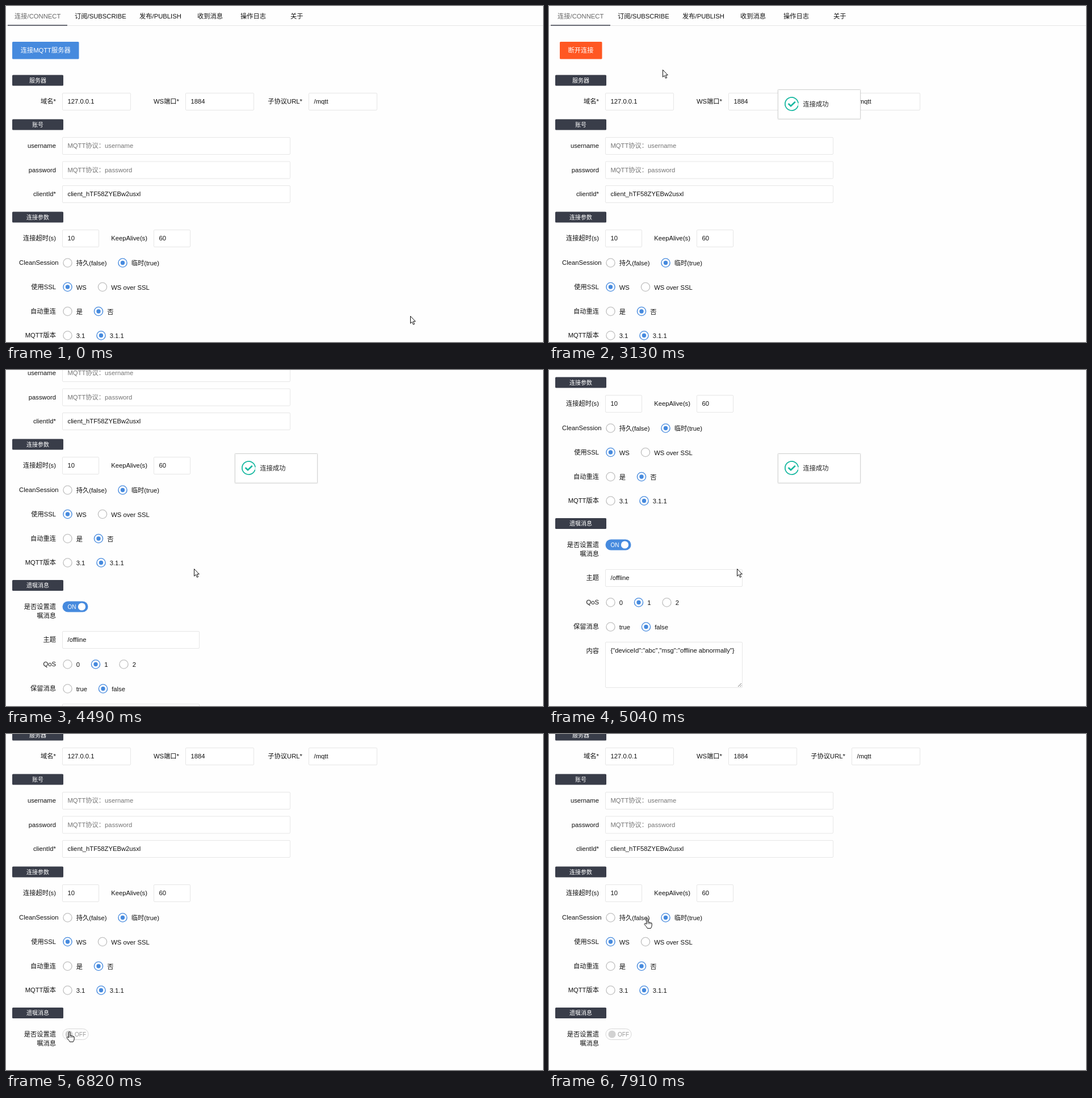
Animation of 946 by 592 pixels, one loop 8 s. Source, as an HTML page:

```html
<!DOCTYPE html>
<html lang="zh">
<head>
<meta charset="utf-8">
<style>
html, body { margin: 0; width: 100%; height: 100%; overflow: hidden; background: #fefefe; }
svg { display: block; font: 11.25px "Liberation Sans", Arial, "Noto Sans CJK SC", "Noto Sans CJK", sans-serif; }
.tag { font-size: 10px; }
</style>
</head>
<body>
<svg id="stage" width="946" height="592" viewBox="0 0 946 592">
  <g id="page">
    <path d="M0 34.5H946" stroke="#e6e6e6"/>
    <path d="M3 34H108" stroke="#393d49" stroke-width="1.6"/>
    <g id="form"></g>
    <g id="connect">
      <rect x="11" y="63" width="117.5" height="30.5" rx="1.6" fill="#468ade"/>
      <text x="69.7" y="82" fill="#fff" text-anchor="middle">连接MQTT服务器</text>
    </g>
    <g id="disconnect">
      <rect x="19" y="63" width="74.5" height="30.5" rx="1.6" fill="#ff5722"/>
      <text x="56" y="82" fill="#fff" text-anchor="middle">断开连接</text>
    </g>
    <g id="on">
      <rect x="99.5" y="648.5" width="45" height="19" rx="9.5" fill="#468ade"/>
      <circle cx="133.5" cy="658" r="6.6" fill="#fff"/>
      <text class="tag" x="108.5" y="662" fill="#fff">ON</text>
    </g>
    <g id="off">
      <rect x="100" y="648.5" width="45" height="19" rx="9.5" fill="#fff" stroke="#d6d6d6"/>
      <circle cx="111" cy="658" r="6.6" fill="#d2d2d2"/>
      <text class="tag" x="121" y="662" fill="#999">OFF</text>
    </g>
    <g id="will">
      <rect id="area" x="99.5" y="829.5" width="241" height="80" rx="1.6" fill="#fff"/>
      <path d="M333 908l6-6M336.5 908l2.5-2.5" stroke="#666" stroke-width=".9"/>
    </g>
  </g>
  <g id="popup">
    <rect x="402" y="146" width="148" height="55" rx="2" fill="#000" opacity=".04"/>
    <rect x="403.5" y="147.5" width="145" height="51.5" rx="1" fill="#fff" stroke="#d3d4d3"/>
    <circle cx="427.5" cy="172.3" r="11.6" fill="none" stroke="#b9e6df" stroke-width="1.4"/>
    <path d="M438.6 176A11.6 11.6 0 1 1 439 171" fill="none" stroke="#16b8a0" stroke-width="1.7"/>
    <path d="M421.6 172l4.4 4.3 7.8-7.6" fill="none" stroke="#16b8a0" stroke-width="2.6"/>
    <text x="447.5" y="177" fill="#222">连接成功</text>
  </g>
  <g id="cursor" stroke-linejoin="round" stroke="#111">
    <path id="arrow" d="M.5 .5V13.2L3.4 10.5 5.5 15.3 7.6 14.4 5.5 9.7H9.3Z" fill="#fff"/>
    <g id="hand" fill="#fff">
      <path d="M4.5 11V2Q4.5 .6 5.7 .6T7 2V7.2Q9.2 6.4 9.6 8 11.7 7.2 12.1 8.8 14 8.3 14.2 10V13Q14 16 12.3 18.4H6.3Q5.5 16 1.2 11.6 .6 10.4 1.8 9.9 3 9.8 4.5 11Z"/>
      <path d="M7 7V11M9.6 8V11M12 9V11" stroke-width=".8"/>
    </g>
    <path id="beam" d="M0 .5H2.5L3.5 1.5 4.5 .5H7M3.5 1V16M0 16.5H2.5L3.5 15.5 4.5 16.5H7" fill="none"/>
  </g>
</svg>
<script>
const $ = id => document.getElementById(id);

function add(parent, name, attrs, content = '') {
  const node = document.createElementNS('http://www.w3.org/2000/svg', name);
  for (const key in attrs) node.setAttribute(key, attrs[key]);
  node.textContent = content;
  parent.append(node);
}

const form = $('form'), will = $('will');
const text = (g, x, y, s, fill = '#111', extra = {}) => add(g, 'text', { x, y, fill, ...extra }, s);
const label = (g, x, y, s) => text(g, x, y, s, '#111', { 'text-anchor': 'end' });

function tag(y, s) {
  add(form, 'rect', { x: 11, y, width: 90, height: 19, rx: 1.6, fill: '#393d49' });
  text(form, 56, y + 13, s, '#fff', { 'text-anchor': 'middle', class: 'tag' });
}

function field(g, x, y, width, name, value, color) {
  label(g, x - 11.5, y + 19, name);
  add(g, 'rect', { x, y: y + .5, width, height: 30, rx: 1.6, fill: '#fff', stroke: '#e6e6e6' });
  text(g, x + 9, y + 19, value, color);
}

// Each option is [centre x, caption, selected].
function radios(g, y, name, options, labelEnd = 88) {
  label(g, labelEnd, y + 3.5, name);
  for (const [cx, caption, selected] of options) {
    const stroke = selected ? '#468ade' : '#c2c2c2';
    add(g, 'circle', { cx, cy: y, r: 7.6, fill: '#fff', stroke, 'stroke-width': 1.4 });
    if (selected) add(g, 'circle', { cx, cy: y, r: 3.7, fill: stroke });
    text(g, cx + 15.2, y + 4.5, caption);
  }
}

[[15, '连接/CONNECT'], [121, '订阅/SUBSCRIBE'], [235, '发布/PUBLISH'],
 [337, '收到消息'], [413, '操作日志'], [501, '关于']]
  .forEach(([x, s], i) => text(form, x, 22, s, i ? '#111' : '#666'));

tag(121.5, '服务器');
field(form, 99.5, 153, 120, '域名*', '127.0.0.1');
field(form, 316.5, 153, 120, 'WS端口*', '1884');
field(form, 533.5, 153, 120, '子协议URL*', '/mqtt');
tag(199.5, '账号');
field(form, 99.5, 231, 401, 'username', 'MQTT协议：username', '#757575');
field(form, 99.5, 273.5, 401, 'password', 'MQTT协议：password', '#757575');
field(form, 99.5, 316, 401, 'clientId*', 'client_hTF58ZYEBw2usxl');
tag(362.5, '连接参数');
field(form, 99.5, 394, 64, '连接超时(s)', '10');
field(form, 260.5, 394, 64, 'KeepAlive(s)', '60');
radios(form, 452.5, 'CleanSession', [[108.5, '持久(false)'], [205.5, '临时(true)', true]], 92.5);
radios(form, 495, '使用SSL', [[108.5, 'WS', true], [170, 'WS over SSL']]);
radios(form, 538, '自动重连', [[108.5, '是'], [163, '否', true]]);
radios(form, 580.5, 'MQTT版本', [[108.5, '3.1'], [167.5, '3.1.1', true]]);
tag(611, '遗嘱消息');
label(form, 88, 661.5, '是否设置遗');
label(form, 88, 677.5, '嘱消息');
field(will, 99.5, 701, 241, '主题', '/offline');
radios(will, 759.5, 'QoS', [[108.5, '0'], [158, '1', true], [207.5, '2']]);
radios(will, 802.5, '保留消息', [[108.5, 'true'], [171, 'false', true]]);
label(will, 88, 849, '内容');
text(will, 108.5, 847.5, '{"deviceId":"abc","msg":"offline abnormally"}');

// Timelines hold each value from its start time.
const pointer = [
  [0, 712, 546, 'arrow'], [1340, 689, 535, 'arrow'], [1490, 545, 425, 'arrow'],
  [1610, 350, 270, 'arrow'], [1730, 185, 137, 'arrow'], [1880, 118, 90, 'arrow'],
  [2030, 118, 90, 'hand'], [2150, 107, 80, 'hand'], [2860, 112, 80, 'arrow'],
  [3010, 150, 95, 'arrow'], [3130, 200, 112, 'arrow'], [3250, 239, 125, 'arrow'],
  [3520, 285, 195, 'arrow'], [3640, 332, 250, 'arrow'], [3760, 366, 288, 'arrow'],
  [4070, 350, 320, 'arrow'], [4190, 331, 350, 'arrow'], [5190, 152, 341, 'arrow'],
  [5340, 142, 322, 'arrow'], [5490, 134, 315, 'hand'], [5610, 130, 311, 'hand'],
  [5760, 127, 307, 'hand'], [6310, 130, 345, 'arrow'], [6430, 129, 415, 'arrow'],
  [6550, 128, 485, 'arrow'], [6670, 123, 524, 'hand'], [6820, 106, 524, 'hand'],
  [7250, 109, 522, 'beam'], [7400, 116, 400, 'arrow'], [7520, 114, 309, 'hand'],
  [7910, 167, 324, 'hand']
];
const scroll = [[0, 0], [4340, 120], [4490, 241], [4890, 333], [5040, 350],
  [6190, 129], [7100, 350], [7790, 129]];
const toast = [[0, 1, 0], [2860, .6, .2], [3010, .96, .9], [3130, 1, 1],
  [5760, 1.03, .3], [5910, 1, 0]];
const hover = [[0, 1], [2030, .88], [2150, .8]];
const at = (keys, t) => keys.findLast(key => key[0] <= t).slice(1);
const show = (id, visible) => $(id).style.display = visible ? '' : 'none';

function draw(now) {
  const t = now % 8000;
  const [x, y, kind] = at(pointer, t), [size, alpha] = at(toast, t);
  const willSet = t < 6190 || (t >= 7100 && t < 7790);

  $('page').setAttribute('transform', `translate(0 ${-at(scroll, t)[0]})`);
  $('cursor').setAttribute('transform', `translate(${x} ${y})`);
  for (const shape of ['arrow', 'hand', 'beam']) show(shape, shape === kind);
  $('popup').setAttribute('transform', `translate(476 173) scale(${size}) translate(-476 -173)`);
  $('popup').setAttribute('opacity', alpha);
  $('connect').setAttribute('opacity', at(hover, t)[0]);
  show('connect', t < 2860);
  show('disconnect', t >= 2860);
  show('on', willSet);
  show('off', !willSet);
  show('will', willSet);
  $('area').setAttribute('stroke', kind === 'beam' ? '#d2d2d2' : '#e6e6e6');
}

function tick() {
  draw(performance.now());
  requestAnimationFrame(tick);
}
tick();
</script>
</body>
</html>
```
